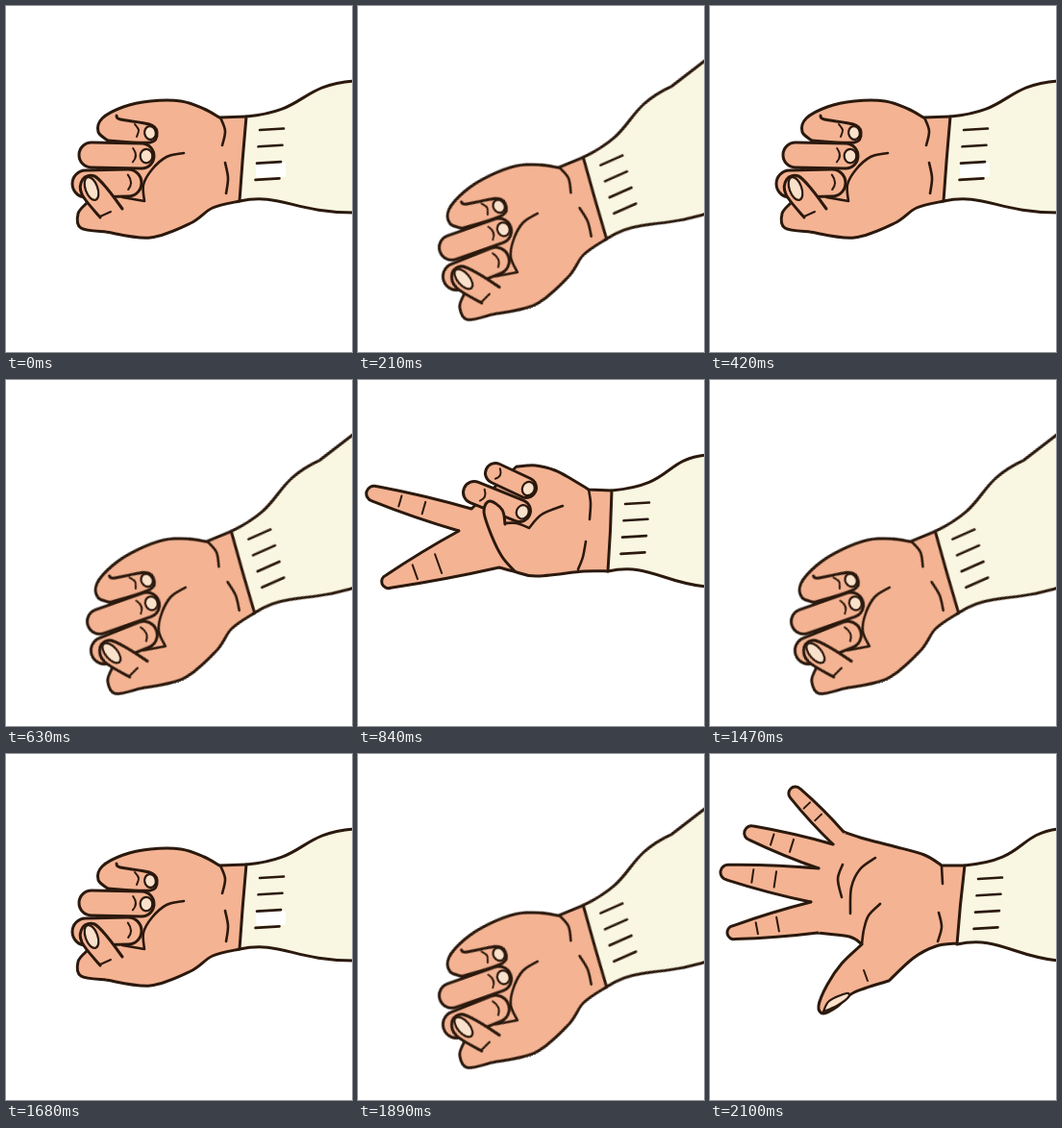
Write an HTML page that moves like this. It is 360 by 360 pixels and loops after 2.52 s.

```html
<!DOCTYPE html>
<html lang="en">
<head>
<meta charset="utf-8">
<title>Rock, scissors, paper</title>
<style>
  html, body { margin: 0; width: 100%; height: 100%; overflow: hidden; background: #fff; }
  svg { display: block; width: 100vw; height: 100vh; }
  path, ellipse, line { stroke: #2b190d; stroke-width: 3; stroke-linecap: round; stroke-linejoin: round; fill: none; }
  .skin { fill: #f4b393; }
  .wool { fill: #f9f6e1; }
  .nail { fill: #fae1cc; stroke-width: 2.2; }
  .mark { stroke-width: 2.6; }
  .thin { stroke-width: 2; }
  .flesh { stroke: #f4b393; }
  .seam { stroke: #f4b393; stroke-width: 5; stroke-linecap: butt; }
  .patch { fill: #fff; stroke: none; }
  .shade { fill: #d5bdb2; stroke: none; }
</style>
</head>
<body>
<svg id="stage" viewBox="0 0 360 360"></svg>
<script>
const BEAT = 210;
const BEATS = [...'RTRTSSRTRTPP']; // rock, tilted rock, scissors, paper

const mix = (a, b, t) => a.map((v, k) => v + (b[k] - v) * t);
const move = (p, dir, s) => p.map((v, k) => v + dir[k] * s);
const path = (cls, d) => `<path class="${cls}" d="${d}"/>`;
const line = (cls, a, b, width) =>
  `<line class="${cls}" x1="${a[0]}" y1="${a[1]}" x2="${b[0]}" y2="${b[1]}"${width ? ` style="stroke-width:${width}"` : ''}/>`;
const ellipse = (cls, [x, y], rx, ry, turn = 0) =>
  `<ellipse class="${cls}" cx="${x}" cy="${y}" rx="${rx}" ry="${ry}" transform="rotate(${turn} ${x} ${y})"/>`;

// Unit vector from a to b, and the length between them.
function aim(a, b) {
  const dx = b[0] - a[0], dy = b[1] - a[1], len = Math.hypot(dx, dy);
  return { dir: [dx / len, dy / len], len };
}

// Smooth path through points; "|" makes a corner at the preceding point.
function curve(cls, text) {
  let d = '', last = null;
  for (const part of text.split('|')) {
    const pts = part.trim().split(/\s+/).map(p => p.split(',').map(Number));
    if (last) pts.unshift(last);
    else d = 'M' + pts[0];
    for (let i = 0; i < pts.length - 1; i++) {
      const b = pts[i], c = pts[i + 1];
      const a = pts[i - 1] || b, e = pts[i + 2] || c;
      d += `C${b.map((v, k) => v + (c[k] - a[k]) / 6)} ${c.map((v, k) => v - (e[k] - b[k]) / 6)} ${c}`;
    }
    last = pts[pts.length - 1];
  }
  return path(cls, d);
}
const curves = (cls, ...list) => list.map(t => curve(cls, t)).join('');

// Straight finger between two webs, tapering to a round tip, with two creases.
function finger(web1, tip, web2, r) {
  const root = mix(web1, web2, 0.5);
  const { dir, len } = aim(root, tip);
  const cross = (web1[0] - root[0]) * -dir[1] + (web1[1] - root[1]) * dir[0];
  const side = Math.sign(cross), n = [-dir[1] * side, dir[0] * side];
  const c = move(tip, dir, -r), p1 = move(c, n, r), p2 = move(c, n, -r);
  const bow1 = move(mix(web1, p1, 0.5), n, r * 0.3), bow2 = move(mix(web2, p2, 0.5), n, -r * 0.3);
  const creases = [0.34, 0.58].map(t => {
    const m = mix(tip, root, t), half = (r + (Math.abs(cross) - r) * t) * 0.6;
    return line('thin', move(m, n, half), move(m, n, -half));
  });
  return line('seam', web1, web2) +
    path('skin', `M${web1}Q${bow1} ${p1}A${r} ${r} 0 0 ${side > 0 ? 0 : 1} ${p2}Q${bow2} ${web2}`) +
    creases.join('');
}

// Folded finger: a capsule with a crease, and a nail at its end.
function curl(a, b, r, back, hasNail = true) {
  const { dir } = aim(a, b), n = [-dir[1], dir[0]];
  const m = move(b, dir, -back);
  const turn = Math.atan2(dir[1], dir[0]) * 180 / Math.PI;
  return line('', a, b, 2 * r + 3) + line('flesh', a, b, 2 * r - 3) +
    path('thin', `M${move(m, n, -r * 0.6)}Q${move(m, dir, 6)} ${move(m, n, r * 0.5)}`) +
    (hasNail ? ellipse('nail', move(b, dir, r - 8), 6.3, 7.3, turn) : '');
}

// Sleeve running off the right edge, from the two ends of the cuff.
function sleeve([x1, y1], [x2, y2], patch) {
  let s = path('wool', `M${x1} ${y1}C${x1 + 65} ${y1 - 6} ${x1 + 53} ${y1 - 32} 362 78L440 54V220L362 215` +
    `C${x2 + 57} ${y2 + 12} ${x2 + 42} ${y2 - 9} ${x2} ${y2}Q${x2 + 3} ${(y1 + y2) / 2} ${x1} ${y1}`);
  if (patch) s += path('patch', 'M260 163h31v15h-31z');
  for (let i = 0; i < 4; i++) {
    const p = [x1 + 14 - i * 1.5, y1 + 14 + i * 17.3];
    s += line('mark', p, move(p, [1, -0.06], 25));
  }
  return s;
}

const rock = patch =>
  curve('skin', `250,115 222,116 | 206,107 182,99 150,99 122,105 100,117 96,131 106,140 |
    84,205 | 75,216 78,231 104,235 | 150,241 192,226 215,210 243,203`) +
  sleeve([250, 115], [243, 203], patch) +
  curl([83, 185], [127, 184], 14, 0, false) +
  curl([89, 155], [141, 156], 13, 9) +
  curve('skin', '115,114 119,118 149,123 157,131 150,142 106,140') +
  ellipse('nail', [150, 132], 5.8, 7, -10) +
  curve('skin', '121,211 106,191 92,177 80,180 79,196 98,220') +
  ellipse('nail', [89, 190], 6.3, 12.5, -20) +
  curves('mark', '185,153 167,157 152,170 143,186 144,203 | 121,199',
    '223,116 228,130 225,145', '228,163 231,179 229,195') +
  curves('thin', '134,123 138,129 136,136', '98,219 109,214');

const scissors = () =>
  curve('skin', `264,115 240,114 | 222,103 205,94 185,89 165,90 | 118,134 | 105,157 | 147,195 |
    162,199 185,204 235,199 260,199`) +
  finger([118, 134], [9, 116], [105, 157], 8) +
  finger([105, 157], [25, 212], [147, 195], 7) +
  sleeve([264, 115], [260, 199]) +
  curl([143, 97], [175, 112], 10.5, 33) +
  curl([121, 117], [168, 136], 11.5, 42) +
  curve('skin', '153,150 150,135 137,126 131,137 139,162 150,184 163,199') +
  curves('mark', '153,149 165,149 178,154 | 191,140 213,131',
    '240,114 242,128 241,145', '237,168 234,184 229,197');

const paper = () =>
  curve('skin', `265,116 241,116 | 223,105 191,96 160,88 139,81 | 128,94 | 113,119 | 105,154 | 112,186 |
    145,190 158,198 | 137,218 122,240 113,262 118,270 132,263 150,248 186,236 | 212,212 235,200 257,197`) +
  ellipse('shade', [104, 117], 7, 4) +
  finger([139, 81], [84, 36], [128, 94], 7) +
  finger([128, 94], [36, 80], [113, 119], 7.5) +
  finger([113, 119], [11, 122], [105, 154], 8) +
  finger([105, 154], [18, 187], [112, 186], 7) +
  sleeve([265, 116], [257, 198]) +
  curve('nail', '118,268 124,257 142,249 144,253 132,262 118,268') +
  curves('mark', '177,156 165,168 160,183 158,198', '172,108 156,120 147,139 146,166',
    '138,115 133,130 137,149', '241,117 242,135', '238,165 241,180 237,195') +
  curve('thin', '160,225 164,236');

const poses = {
  R: rock(true),
  T: `<g transform="translate(-16 42.5) rotate(-20.5 250 114)">${rock(false)}</g>`,
  S: scissors(),
  P: paper()
};

const stage = document.getElementById('stage');
stage.innerHTML = Object.entries(poses).map(([id, art]) => `<g id="${id}">${art}</g>`).join('');

for (const id in poses) {
  const steps = BEATS.map((b, i) => ({ offset: i / BEATS.length, opacity: +(b === id), easing: 'step-end' }));
  steps.push({ offset: 1, opacity: steps[0].opacity });
  document.getElementById(id).animate(steps, { duration: BEAT * BEATS.length, iterations: Infinity });
}
</script>
</body>
</html>
```
